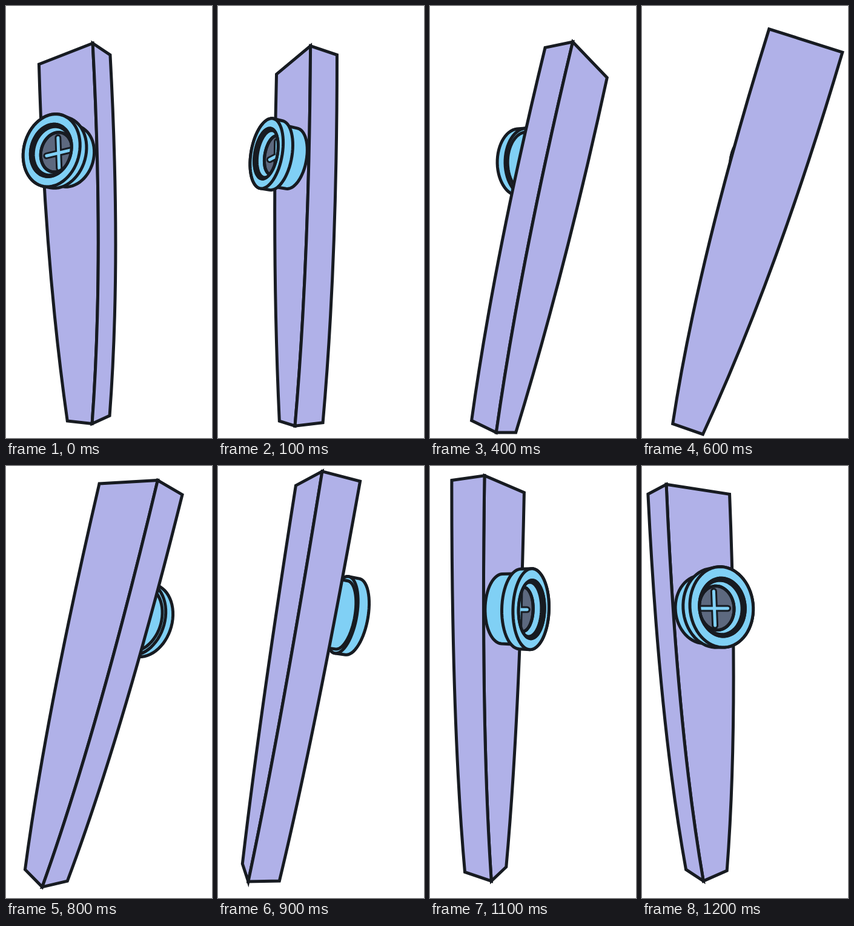
Animation of 340 by 710 pixels, one loop 1.3 s. Source, as an HTML page:

```html
<!DOCTYPE html>
<html lang="en">
<head>
<meta charset="utf-8">
<title>Turning kazoo</title>
<style>
  html, body { margin: 0; width: 100%; height: 100%; overflow: hidden; background: #fff; }
  svg { display: block; width: 340px; height: 710px; }
</style>
</head>
<body>
<svg id="stage" viewBox="0 0 340 710" stroke-width="5" stroke-linejoin="miter"></svg>
<script>
const INK = '#171b21', BODY = '#b0b1e8', RIM = '#80d0f5', HOLE = '#5d697f';
const STEP = 100, STEPS = 13;
const START = -Math.PI / 5, TURN = -Math.PI / 7.5;
const stage = document.getElementById('stage');

// Camera, and the leaning axis the kazoo turns about.
const camera = { x: 114, y: 368, distance: 815 };
const axis = { offset: 22, lean: 0.11 };

// Model space: x along the width, y up the axis, z out of the knob's face.
const topEnd = { left: -149, right: -33, leftY: 290, rightY: 313, depth: 56 };
const bottomEnd = { left: 0, right: 48, leftY: -316, rightY: -305, depth: 53 };
const BULGE = 23;
const knob = { x: -58, y: 122, radius: 59.5, neck: 53, length: 50, collar: 32 };
const tilt = Math.atan2(115, 611);

const sub = (a, b) => a.map((v, i) => v - b[i]);
const mix = (a, b, k) => a.map((v, i) => v + (b[i] - v) * k);
const cross = (a, b) => a[0] * b[1] - a[1] * b[0];
const txt = p => p.map(v => v.toFixed(2)).join(' ');

const path = (d, fill) => `<path d="${d}" fill="${fill}" stroke="${INK}"/>`;
const polygon = points => `M${points.map(txt).join('L')}Z`;

function makeProjector(angle) {
  const c = Math.cos(angle), s = Math.sin(angle);
  const leanCos = Math.cos(axis.lean), leanSin = Math.sin(axis.lean);
  return ([x, y, z]) => {
    const across = x * c + z * s, near = z * c - x * s;
    const zoom = camera.distance / (camera.distance - near);
    return [
      camera.x + (axis.offset + across * leanCos + y * leanSin) * zoom,
      camera.y + (across * leanSin - y * leanCos) * zoom
    ];
  };
}

function makeEdge(project, right, back) {
  const corner = end => [
    right ? end.right : end.left,
    right ? end.rightY : end.leftY,
    back ? -end.depth : 0
  ];
  const top = corner(topEnd), bottom = corner(bottomEnd);
  const bend = mix(top, bottom, 0.58);
  bend[0] += right ? BULGE : -BULGE;
  return { top: project(top), bend: project(bend), bottom: project(bottom) };
}

// Faces seen almost edge-on count as hidden.
const facing = (a, b) =>
  cross(sub(b.bottom, a.top), sub(a.bottom, b.top)) > 2000;

function drawBody(edges) {
  return edges.map((a, i) => {
    const b = edges[(i + 1) % 4];
    return facing(a, b) ? path(
      `M${txt(a.top)}L${txt(b.top)}Q${txt(b.bend)} ${txt(b.bottom)}` +
      `L${txt(a.bottom)}Q${txt(a.bend)} ${txt(a.top)}Z`, BODY) : '';
  }).join('');
}

function knobPoint(project, radius, angle, z) {
  return project([
    knob.x + radius * Math.cos(angle), knob.y + radius * Math.sin(angle), z
  ]);
}

function ring(project, radius, z) {
  return Array.from({ length: 64 }, (_, i) =>
    knobPoint(project, radius, i * Math.PI / 32, z));
}

function hull(points) {
  const sorted = [...points].sort((a, b) => a[0] - b[0] || a[1] - b[1]);
  const chain = list => {
    const out = [];
    for (const p of list) {
      while (out.length > 1 &&
        cross(sub(out.at(-1), out.at(-2)), sub(p, out.at(-1))) <= 0) out.pop();
      out.push(p);
    }
    return out.slice(0, -1);
  };
  return [...chain(sorted), ...chain(sorted.reverse())];
}

function drawMouth(project) {
  const disc = (radius, z) => polygon(ring(project, radius, z));
  const rim = disc(43, knob.length), hole = disc(33, 35);
  const bar = angle => [angle, angle + Math.PI]
    .map((a, i) => (i ? 'L' : 'M') + txt(knobPoint(project, 26, a, 28))).join('');
  const plus = bar(tilt) + bar(tilt + Math.PI / 2);
  return `<clipPath id="rim"><path d="${rim}"/></clipPath>
    <clipPath id="hole"><path d="${hole}"/></clipPath>` +
    path(rim, INK) +
    `<g clip-path="url(#rim)">` + path(disc(40, 46), RIM) + path(hole, HOLE) +
    `<g clip-path="url(#hole)" fill="none" stroke-linecap="round">
      <path d="${plus}" stroke="${INK}" stroke-width="11"/>
      <path d="${plus}" stroke="${RIM}" stroke-width="5"/></g>` +
    path(hole, 'none') + '</g>' + path(rim, 'none');
}

function drawKnob(project) {
  const front = ring(project, knob.radius, knob.length);
  const back = ring(project, knob.radius, knob.collar);
  const neck = ring(project, knob.neck, knob.collar);
  const foot = ring(project, knob.neck, 0);
  const lip = path(polygon(hull([...front, ...back])), RIM);
  const barrel = path(polygon(hull([...neck, ...foot])), RIM);
  const area = front.reduce((sum, p, i) => sum + cross(front.at(i - 1), p), 0) / 2;
  return area < -300
    ? barrel + lip + path(polygon(front), RIM) + drawMouth(project)
    : lip + path(polygon(back), RIM) + barrel + path(polygon(foot), INK);
}

function render(step) {
  const project = makeProjector(START + TURN * step);
  const edges = [[0, 0], [1, 0], [1, 1], [0, 1]]
    .map(([right, back]) => makeEdge(project, right, back));
  const body = drawBody(edges), mouthpiece = drawKnob(project);
  stage.innerHTML = facing(edges[0], edges[1]) ? body + mouthpiece : mouthpiece + body;
}

let shown = -1;
const start = performance.now();
function tick() {
  const step = Math.floor((performance.now() - start) / STEP) % STEPS;
  if (step !== shown) render(shown = step);
  requestAnimationFrame(tick);
}
tick();
</script>
</body>
</html>
```
